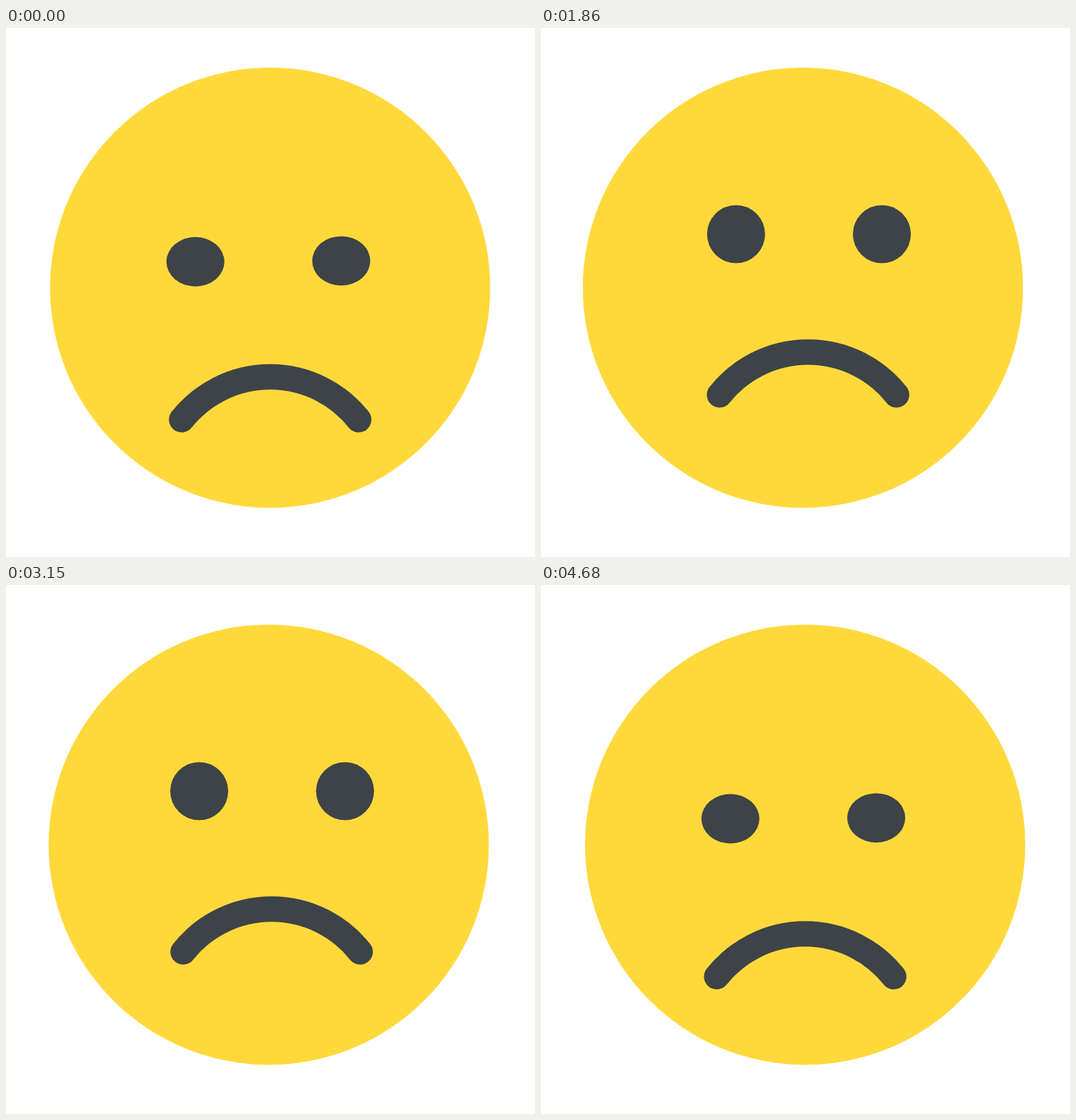
Recreate the animation shown at these times as an HTML page. Size 748x748 px, loop 5070 ms.

```html
<!DOCTYPE html>
<html lang="en">
<head>
<meta charset="utf-8">
<title>Sad face</title>
<style>
  html, body { margin: 0; width: 100%; height: 100%; overflow: hidden; background: #fff; }
  svg { display: block; width: 100%; height: 100%; }
</style>
</head>
<body>
<svg viewBox="0 0 748 748">
  <circle id="head" cx="373.5" cy="367.3" r="311.2" fill="#ffd93b"/>
  <g fill="#3e4347">
    <ellipse id="leftEye" rx="41"/>
    <ellipse id="rightEye" rx="41"/>
  </g>
  <path id="mouth" d="M248.4 518.7A159.8 159.8 0 0 1 498.7 518.7" fill="none"
        stroke="#3e4347" stroke-width="36" stroke-linecap="round"/>
</svg>
<script>
const LOOP = 5070, STEP = 30;
const [head, leftEye, rightEye, mouth] =
  ['head', 'leftEye', 'rightEye', 'mouth'].map(id => document.getElementById(id));

const clamp = u => Math.min(1, Math.max(0, u));
const smooth = u => u * u * (3 - 2 * u);
const mix = (a, b, u) => a + (b - a) * u;
const phase = (t, start, end) => clamp((t - start) / (end - start));

// Horizontal-handled bezier easing from (0,0) to (1,1), solved by bisection.
function ease(u, out, into) {
  let low = 0, high = 1;
  for (let i = 0; i < 24; i++) {
    const s = (low + high) / 2, r = 1 - s;
    if (3 * out * s * r * r + 3 * into * s * s * r + s * s * s < u) low = s;
    else high = s;
  }
  return smooth(low);
}

// How far a part is lowered: 1 at the start, 0 while looking up, 1 at the end.
const lowered = (t, upEnd, downStart) => t < 2000
  ? 1 - ease(phase(t, 0, upEnd), .5, .5)
  : ease(phase(t, downStart, 4690), .4, .45);

const shakeTimes = [1230, 1530, 1980, 2430, 2880, 3390];
const shakes = {
  head: [0, 5, -4.9, 5, -4.4, 0],
  eyes: [0, -8, 8.5, -8, 6.6, 0],
  mouth: [0, -6, 6.2, -6, 4.5, 0]
};

function shake(t, values) {
  const i = shakeTimes.findIndex(time => t < time);
  if (i < 1) return 0;
  return mix(values[i - 1], values[i], smooth(phase(t, shakeTimes[i - 1], shakeTimes[i])));
}

function placeEye(eye, x, y, ry) {
  eye.setAttribute('cx', x);
  eye.setAttribute('cy', y);
  eye.setAttribute('ry', ry);
}

const shift = (part, x, y) => part.setAttribute('transform', `translate(${x} ${y})`);

function draw(t) {
  const eyesDown = lowered(t, 770, 3735);
  const mouthDown = lowered(t, 810, 3690);
  const squint = t < 2000 ? 1 - smooth(phase(t, 0, 360)) : smooth(phase(t, 4320, 4680));
  const eyesX = shake(t, shakes.eyes) - 2.4 * eyesDown;
  const ry = mix(41, 34.9, squint);

  shift(head, shake(t, shakes.head), 0);
  placeEye(leftEye, 270.2 + eyesX, mix(291.5, 330.5, eyesDown), ry);
  placeEye(rightEye, 476.4 + eyesX, mix(291.5, 329.3, eyesDown), ry);
  shift(mouth, shake(t, shakes.mouth), 35.1 * mouthDown);
}

const begin = performance.now();
function tick() {
  const t = (performance.now() - begin) % LOOP;
  draw(Math.floor(t / STEP) * STEP);
  requestAnimationFrame(tick);
}
tick();
</script>
</body>
</html>
```
